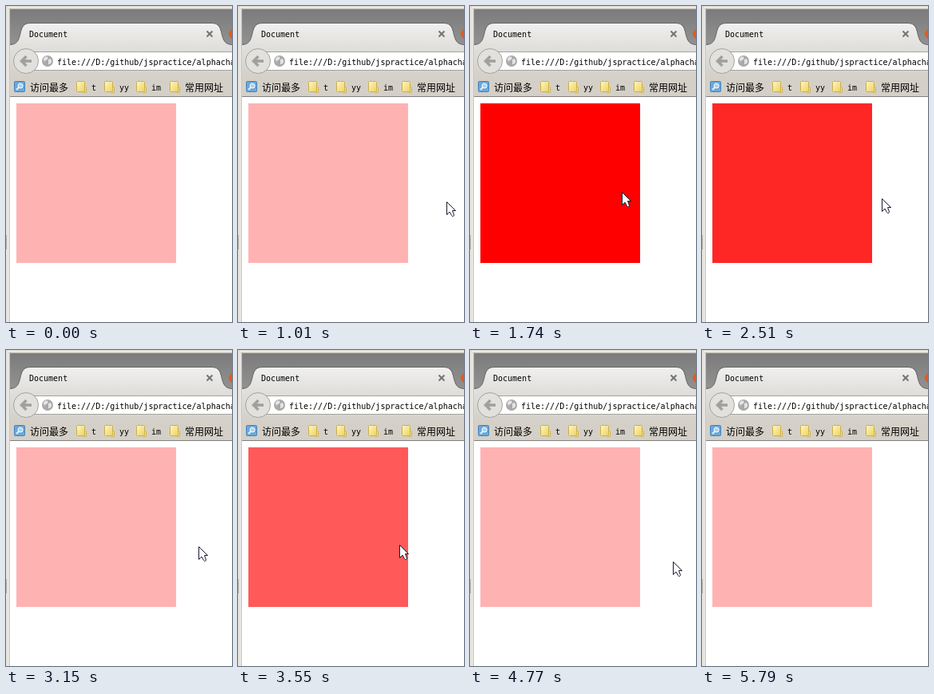
These frames come from a looping animation (283x396 px, 6200 ms). An HTML page:

```html
<!DOCTYPE html>
<html lang="zh">
<head>
<meta charset="utf-8">
<style>
  html, body { margin: 0; width: 100%; height: 100%; overflow: hidden; background: #fff; }
  svg { display: block; width: 283px; height: 396px; }
  text { font: 10px "DejaVu Sans Mono", monospace; white-space: pre; }
  .zh { font: 12px "Noto Sans CJK SC", "Noto Sans CJK", sans-serif; }
</style>
</head>
<body>
<svg viewBox="0 0 283 396">
  <defs>
    <linearGradient id="title" x2="0" y2="1"><stop stop-color="#7b7b7b"/><stop offset="1" stop-color="#929292"/></linearGradient>
    <linearGradient id="tab" x2="0" y2="1"><stop stop-color="#f0f0ef"/><stop offset="1" stop-color="#e2e1de"/></linearGradient>
    <linearGradient id="bar" x2="0" y2="1"><stop stop-color="#e2e1de"/><stop offset="1" stop-color="#d4d0c8"/></linearGradient>
    <linearGradient id="gold" x2="1" y2="1"><stop stop-color="#fff8bd"/><stop offset="1" stop-color="#ecd262"/></linearGradient>
    <g id="folder" fill="url(#gold)" stroke="#cdae4a">
      <rect x="9.5" y="7.5" width="4" height="7" rx="1"/>
      <rect x="1.5" y=".5" width="10" height="13" rx="1"/>
    </g>
  </defs>

  <!-- window frame -->
  <rect width="283" height="396" fill="#d4d0c8"/>
  <rect width="1" height="396" fill="#f1efe9"/>
  <rect y="287" width="1" height="18" fill="#b9b6ae"/>
  <path d="M2.500 396V1.500H283" fill="none" stroke="#fff"/>
  <rect x="5" y="4" width="278" height="45" fill="url(#title)"/>

  <!-- tab and toolbars -->
  <circle cx="285.500" cy="35" r="6.500" fill="#e8591c"/>
  <rect x="5" y="48" width="278" height="43" fill="url(#bar)"/>
  <path d="M5 48.500C24 48 12 21.500 30 21.500H258C276 21.500 264 48 283 48.500" fill="url(#tab)" stroke="#636363"/>
  <path d="M30 22.500H258" stroke="#fafafa"/>
  <rect x="5" y="113" width="278" height="1" fill="#808080"/>
  <text x="29" y="39">Document</text>
  <path d="M251.500 31.500l7 7m0-7l-7 7" stroke="#747474" stroke-width="2"/>

  <!-- address bar -->
  <rect x="32" y="57.500" width="260" height="23" fill="#fff" stroke="#a5a29c"/>
  <circle cx="25" cy="69" r="15.500" fill="#e3e1dd" stroke="#a5a39e"/>
  <path d="M25.500 63l-6 6l6 6M20 69h12" fill="none" stroke="#a0a09e" stroke-width="3.500"/>
  <circle cx="52" cy="69" r="7" fill="#a9a9a9"/>
  <path d="M47 66q3-4 5-2t-2 4t-2 3zM53 67q4-2 4 2t-4 4z" fill="#e6e6e6"/>
  <text x="64" y="74">file:///D:/github/jspractice/alphacha</text>

  <!-- bookmarks -->
  <rect x="10.500" y="94.500" width="13" height="13" rx="1" fill="#69a9da" stroke="#4682b8"/>
  <path d="M16 102l-3 3" stroke="#e4f3ff" stroke-width="2"/>
  <circle cx="18" cy="100" r="3" fill="#a9d3f0" stroke="#fff"/>
  <text class="zh" x="30" y="107">访问最多</text>
  <g id="marks"></g>

  <!-- page -->
  <rect x="5" y="114" width="278" height="282" fill="#fff"/>
  <rect id="box" x="13" y="122" width="200" height="200" fill="#f00"/>
  <path id="cursor" d="M.5 .5V16.500L4 13L6.500 17.500L7.500 18.500H8.500L9.500 17L7.500 11.500H11.500z" fill="#fff" stroke="#1a1a30"/>
</svg>
<script>
const LOOP = 6200;
const [box, cursor, marks] = ['box', 'cursor', 'marks'].map(id => document.getElementById(id));

const folders = { 87: 't', 122: 'yy', 162: 'im', 204: '常用网址', 282: '' };
for (const [x, name] of Object.entries(folders)) {
  const zh = name.length > 2;
  marks.innerHTML += `<use href="#folder" x="${x}" y="94"/>
    <text class="${zh ? 'zh' : ''}" x="${+x + 20}" y="${zh ? 107 : 106}">${name}</text>`;
}

// Cursor tip: time, x, y; straight moves between the stops
const stops = [
  [840, 279, 247], [1430, 217, 241], [1470, 217, 241], [1740, 190, 233],
  [2240, 190, 233], [2510, 225, 241], [2850, 245, 246], [3100, 245, 246],
  [3150, 241, 246], [3670, 190, 243], [3930, 190, 243], [4530, 245, 260],
  [4590, 245, 260], [4770, 254, 265], [5450, 254, 265], [5790, 269, 397]
];

// The box turns solid while hovered: times of entering and leaving
const hovers = [[1503, 2458], [3435, 4213]];

const ramp = t => Math.min(14, Math.max(0, Math.floor(t / 15)));
const mix = (a, b, k) => Math.round(a + (b - a) * k);

function alpha(t) {
  return hovers.reduce((a, [enter, leave]) =>
    a + 0.05 * (ramp(t - enter) - ramp(t - leave)), 0.3);
}

function tip(t) {
  const i = stops.findIndex(s => s[0] > t);
  if (i < 1) return null;
  const [t0, x0, y0] = stops[i - 1], [t1, x1, y1] = stops[i];
  const k = (t - t0) / (t1 - t0);
  return [mix(x0, x1, k), mix(y0, y1, k)];
}

function draw() {
  const t = performance.now() % LOOP;
  const pos = tip(t);
  box.setAttribute('fill-opacity', alpha(t).toFixed(2));
  cursor.setAttribute('visibility', pos ? 'visible' : 'hidden');
  if (pos) cursor.setAttribute('transform', `translate(${pos})`);
  requestAnimationFrame(draw);
}
draw();
</script>
</body>
</html>
```
